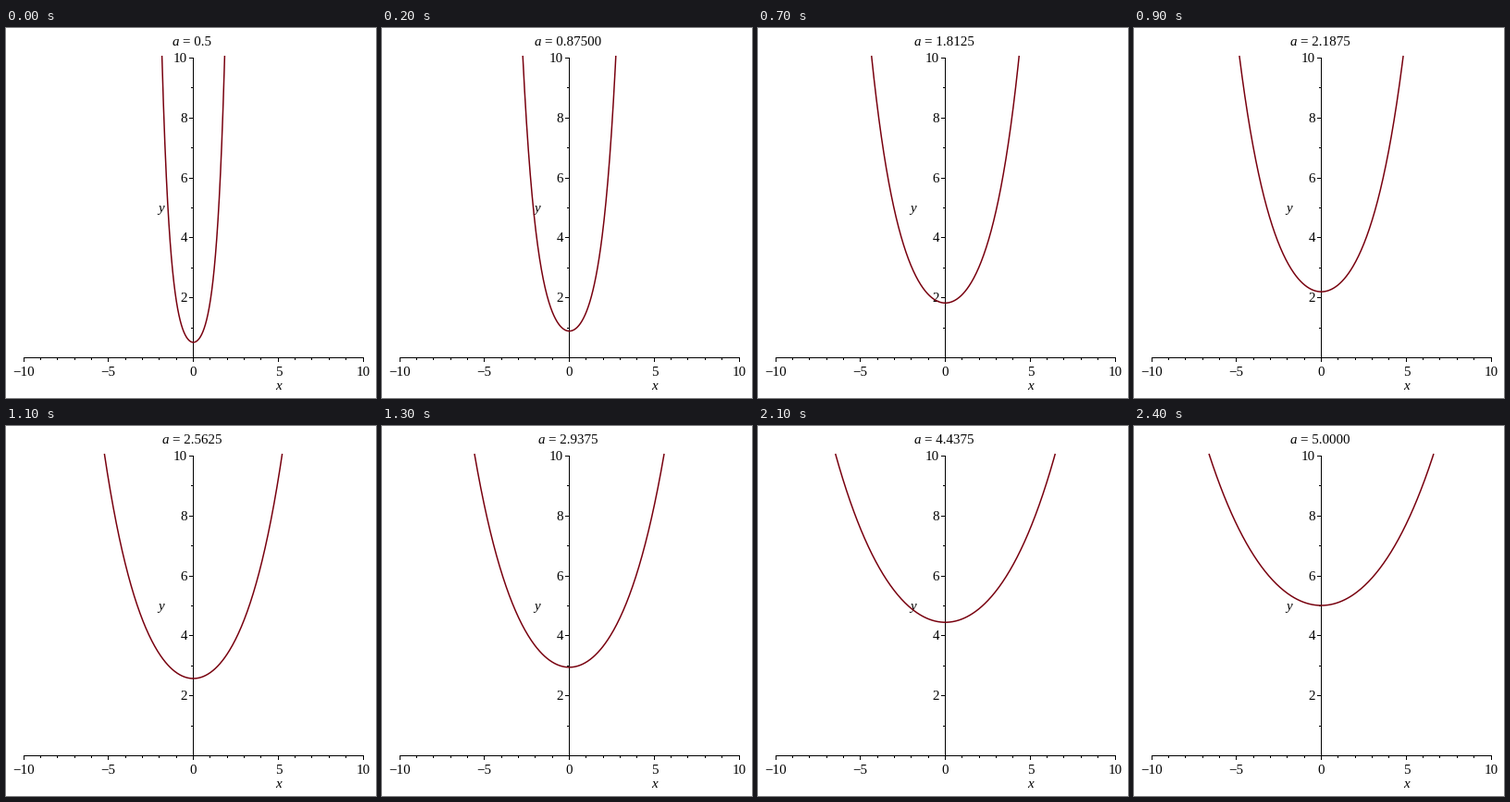
Recreate the animation shown at these times as a matplotlib script. Size 400 by 400 pixels, loop 2.5 s.

```python
import numpy as np
import matplotlib.pyplot as plt
from matplotlib.animation import FuncAnimation

SIZE, DPI = 400, 100
PX = 72 / DPI                # points per pixel
FONT = 15                    # text height in pixels
X0, Y0 = 202.5, 356          # pixel position of the origin
SX, SY = 18.35, 32.4         # pixels per unit
TOP = 10 + 2 / SY            # curve is cut just above y = 10
FRAMES = 25

plt.rcParams["font.family"] = "Liberation Serif"

fig = plt.figure(figsize=(SIZE / DPI, SIZE / DPI), dpi=DPI, facecolor="white")
ax = fig.add_axes([0, 0, 1, 1])
ax.set_xlim(0, SIZE)
ax.set_ylim(SIZE, 0)
ax.axis("off")


def line(x1, y1, x2, y2):
    # Snapping would push half-pixel centres to the next pixel.
    ax.plot([x1, x2], [y1, y2], color="black", lw=PX, snap=False,
            solid_capstyle="butt", zorder=2)


def label(x, y, s, ha="center", style="normal"):
    return ax.text(x, y, s, ha=ha, va="baseline", style=style,
                   fontsize=FONT * PX, color="black", zorder=2)


def draw_axes():
    line(19, Y0 + 0.5, 387, Y0 + 0.5)
    line(X0, 32, X0, Y0 + 1)
    for v in range(-10, 11):
        major = v % 5 == 0
        x = np.floor(X0 + v * SX) + 0.5
        line(x, Y0, x, Y0 + (5 if major else 3))
        if major:
            label(x, 376, str(v).replace("-", "\u2212"))
    for v in range(1, 11):
        major = v % 2 == 0
        y = np.round(Y0 - v * SY) + 0.5
        line(198 if major else 200, y, 203, y)
        if major:
            label(196.2, y + 4.5, str(v), ha="right")
    label(294.5, 391, "x", style="italic")
    label(167.5, 199, "y", style="italic")


draw_axes()
curve, = ax.plot([], [], color="#78000e", lw=1.5 * PX, snap=False,
                 solid_capstyle="butt", zorder=3)
name = label(0, 19, "a", ha="left", style="italic")
value = label(0, 19, "", ha="left")


def update(i):
    a = 0.5 + 4.5 * i / (FRAMES - 1)
    end = a * np.arccosh(TOP / a)
    x = np.linspace(-end, end, 301)
    curve.set_data(X0 + SX * x, Y0 - SY * a * np.cosh(x / a))

    number = f"{a:#.5g}" if i else "0.5"
    width = FONT * (1.314 + 0.5 * len(number))
    left = 201 - width / 2
    name.set_x(left)
    value.set_x(left + 0.75 * FONT)
    value.set_text("= " + number)
    return curve, name, value


anim = FuncAnimation(fig, update, frames=FRAMES, interval=100,
                     repeat=True, repeat_delay=0, blit=False)
plt.show()
```
